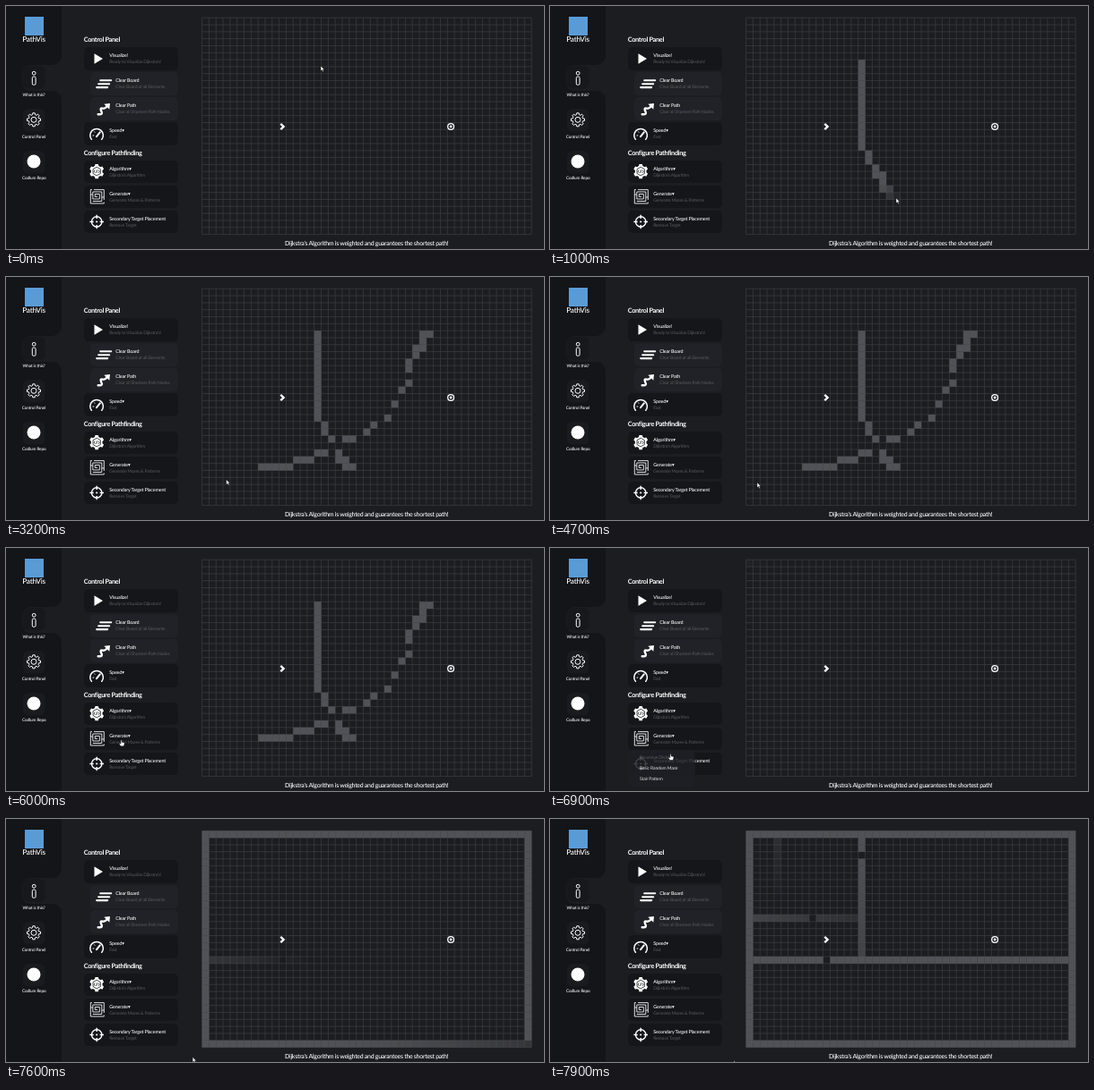
Animation of 600x272 px, one loop 8000 ms. Source, as an HTML page:

```html
<!DOCTYPE html>
<html lang="en">
<head>
<meta charset="utf-8">
<title>Pathfinding board</title>
<style>
html, body { margin: 0; width: 100%; height: 100%; overflow: hidden; background: #1c1d21; }
svg { display: block; width: 100vw; height: 100vh; }
text { font-family: Lato, "Open Sans", sans-serif; letter-spacing: -.03em; fill: #fff; text-rendering: geometricPrecision; }
.name { font-size: 8.3px; text-anchor: middle; font-weight: 500; }
.nav { font-size: 4.75px; text-anchor: middle; font-weight: 500; }
.head { font-size: 7.4px; font-weight: 700; letter-spacing: -.045em; }
.title { font-size: 5.4px; font-weight: 500; }
.sub { font-size: 5px; fill: #5a5b5f; }
.item { font-size: 5.1px; }
.foot { font-size: 7px; text-anchor: middle; font-weight: 500; letter-spacing: -.043em; }
.line { fill: none; stroke: #fff; }
</style>
</head>
<body>
<svg viewBox="0 0 600 272" id="stage">
  <!-- sidebar with the notch of the active tab -->
  <path fill="#141519" d="M0 0H62V54Q62 66 50 66H28Q18 66 18 76V85Q18 95 28 95H50Q62 95 62 107V272H0Z"/>
  <g fill="#17181c">
    <rect x="19" y="67" width="24.500" height="25.500" rx="6"/>
    <rect x="19" y="115" width="24.500" height="25.500" rx="6" fill="#1a1b1f"/>
    <rect x="19" y="162" width="24.500" height="25.500" rx="6" fill="#1a1b1f"/>
  </g>
  <rect x="21" y="12" width="21" height="21" fill="#5b9bd5"/>
  <text class="name" x="31" y="39.500">PathVis</text>
  <g class="line" stroke-width="1">
    <circle cx="31.200" cy="75.200" r="1.900"/>
    <rect x="29.300" y="79" width="3.800" height="9.300" rx="1.600"/>
    <circle cx="31" cy="127.300" r="3"/>
    <path id="cog" stroke-linejoin="round"/>
  </g>
  <circle cx="31" cy="174" r="7.500" fill="#fff"/>
  <text class="nav" x="31" y="100.700">What is this?</text>
  <text class="nav" x="31" y="147.700">Control Panel</text>
  <text class="nav" x="31.300" y="194.300">Codlum Repo</text>

  <text class="head" x="86.700" y="40.200">Control Panel</text>
  <text class="head" x="86.700" y="166.600">Configure Pathfinding</text>
  <g id="cards"></g>

  <!-- card icons -->
  <path fill="#fff" d="M98.500 53.200L108 59 98.500 64.800Z"/>
  <path class="line" stroke-width="2.100" stroke-linecap="round" d="M105.200 83.300H117.200M103.200 87.200H115.200M101.200 91.100H113.200"/>
  <path class="line" stroke-width="2.400" stroke-linecap="round" stroke-linejoin="round" d="M102.700 121.300H105Q108 121 106.300 117.700Q104.300 113.700 108 114.700Q110 115.300 112.500 112.500"/>
  <path fill="#fff" d="M109.300 109.700L116 109.100 115.300 115.700Z"/>
  <g class="line" stroke-width="1.500" stroke-linecap="round">
    <path d="M95.400 149.300A7.300 7.300 0 1 1 106.800 149.300"/>
    <path d="M101 146.200L104.800 141.300" stroke-width="2"/>
    <path d="M97 145H97.800M98.600 140.800L99 141.300" stroke-width="1"/>
  </g>
  <path id="gear" fill="#fff"/>
  <g fill="none" stroke="#15161a" stroke-width=".8">
    <path d="M101.200 180.300L105.400 182.700V187.500L101.200 189.900 97 187.500V182.700Z"/>
    <path d="M99.300 183.600L98.200 185.200 99.300 186.800M103.100 183.600L104.200 185.200 103.100 186.800M101.700 183.400L100.700 187"/>
  </g>
  <path class="line" stroke-width=".85" d="M98 205.600H109.300V217M109.300 219.500V221H94.300V205.600H96M96.800 218.500H106.800V208H96.800V216H104.300V210.500H99.300V213.500H101.900M94.300 211H96.800M106.800 214H109.300"/>
  <g class="line" stroke-width="1.400">
    <circle cx="101.200" cy="241.500" r="5.700"/>
    <path d="M101.200 233.700V238M101.200 245V249.300M93.400 241.500H97.700M104.700 241.500H109"/>
    <circle cx="101.200" cy="241.500" r="1.100" fill="#fff" stroke="none"/>
  </g>

  <path id="grid" fill="none" stroke="#3d3e42" stroke-width=".7"/>
  <g id="walls" fill="#515257"></g>
  <path class="line" stroke-width="2.300" d="M306.300 131.900L309.600 135 306.300 138.100"/>
  <circle class="line" cx="496.100" cy="135" r="3.400" stroke-width="1.300"/>
  <circle cx="496.100" cy="135" r="1.400" fill="#fff"/>
  <text class="foot" x="402.300" y="268.300">Dijkstra's Algorithm is weighted and guarantees the shortest path!</text>

  <g id="menu">
    <rect x="87" y="226" width="74.500" height="41" rx="5" fill="#1e2025"/>
    <text class="item" id="pick" x="100" y="236.200">Recursive Division</text>
    <text class="item" x="100" y="248">Basic Random Maze</text>
    <text class="item" x="100" y="259.500">Stair Pattern</text>
  </g>

  <g id="cursor">
    <path id="arrow" fill="#fff" stroke="#000" stroke-width=".4" d="M0 0V5.600L1.400 4.500 2.400 6.700 3.300 6.300 2.400 4.200H4Z"/>
    <path id="hand" fill="#fff" stroke="#000" stroke-width=".4" d="M-.6 0Q0-.8.6 0V2L3 2.600Q3.700 3 3.400 4L2.700 6.500H-.8L-2.400 4Q-2.500 3-1.600 3.200L-.6 4Z"/>
    <circle id="busy" cx="4.200" cy="-.4" r="2" fill="none" stroke="#3b82c4" stroke-width="1.100"/>
  </g>
</svg>
<script>
const LOOP = 8000, TICK = 100, FADE = 180;
const X0 = 218.6, Y0 = 13.2, CELL = 7.82, COLS = 47, ROWS = 31;
const CLEAR = 6900, MAZE_START = 6890, MAZE_STEP = 4.3;
const $ = id => document.getElementById(id);

function add(parent, tag, attrs, text) {
  const el = document.createElementNS("http://www.w3.org/2000/svg", tag);
  for (const k in attrs) el.setAttribute(k, attrs[k]);
  if (text) el.textContent = text;
  return parent.appendChild(el);
}

const range = (a, b) => {
  const step = a <= b ? 1 : -1;
  return Array.from({ length: Math.abs(b - a) + 1 }, (_, i) => a + i * step);
};
const column = (c, a, b) => range(a, b).map(r => [c, r]);
const row = (r, a, b) => range(a, b).map(c => [c, r]);

// Linear track through [key, value, value, ...] points
function track(points, k) {
  const last = points[points.length - 1];
  if (k <= points[0][0]) return points[0].slice(1);
  if (k >= last[0]) return last.slice(1);
  const i = points.findIndex(p => p[0] > k), a = points[i - 1], b = points[i];
  const f = (k - a[0]) / (b[0] - a[0]);
  return a.slice(1).map((v, j) => v + (b[j + 1] - v) * f);
}

function gearPath(cx, cy, inner, outer, teeth) {
  const pts = [];
  for (let i = 0; i < teeth; i++) {
    [[-.32, inner], [-.2, outer], [.2, outer], [.32, inner]].forEach(([o, r]) => {
      const a = (i + o) / teeth * 2 * Math.PI - Math.PI / 2;
      pts.push((cx + r * Math.cos(a)).toFixed(2) + " " + (cy + r * Math.sin(a)).toFixed(2));
    });
  }
  return "M" + pts.join("L") + "Z";
}
$("cog").setAttribute("d", gearPath(31, 127.3, 5.8, 7.6, 8));
$("gear").setAttribute("d", gearPath(101.2, 185.1, 6.4, 8.3, 6));

const DARK = "#15161a", LIGHT = "#202227";
[
  [87, 46, 26, "Visualize!", "Ready to Visualize Dijkstra's!", DARK],
  [94, 74, 26, "Clear Board", "Clear Board of all Elements", LIGHT],
  [94, 102, 26, "Clear Path", "Clear all Shortest-Path Nodes", LIGHT],
  [87, 130, 26, "Speed▾", "Fast", DARK],
  [87, 173, 25, "Algorithm▾", "Dijkstra's Algorithm", DARK],
  [87, 201, 25, "Generate▾", "Generate Mazes & Patterns", DARK],
  [87, 229, 25, "Secondary Target Placement", "Remove Target", DARK]
].forEach(([x, y, height, title, sub, fill]) => {
  const g = $("cards");
  add(g, "rect", { x, y, width: 192 - x, height, rx: 5, fill });
  add(g, "text", { class: "title", x: x + 28.3, y: y + 10.9 }, title);
  add(g, "text", { class: "sub", x: x + 28.3, y: y + 18.2 }, sub);
});

const right = X0 + COLS * CELL, bottom = Y0 + ROWS * CELL;
$("grid").setAttribute("d",
  range(0, COLS).map(i => `M${X0 + i * CELL} ${Y0}V${bottom}`).join("") +
  range(0, ROWS).map(i => `M${X0} ${Y0 + i * CELL}H${right}`).join(""));

const walls = [];
function addWall([c, r], on, off) {
  const el = add($("walls"), "rect", {
    x: X0 + c * CELL, y: Y0 + r * CELL, width: CELL + .05, height: CELL + .05
  });
  walls.push({ c, r, on, off, el });
}

// Hand-drawn strokes
const first = [
  ...column(16, 6, 18), ...column(17, 19, 20), ...column(18, 21, 22),
  ...column(19, 22, 24), ...column(20, 24, 25), [21, 25]
];
first.forEach((cell, i) => addWall(cell, 100 + i * 40, CLEAR));

const second = [
  ...row(6, 32, 31), ...column(31, 7, 8), ...column(30, 8, 9), ...column(29, 10, 11),
  [29, 13], [28, 14], [27, 16], [26, 18], [24, 19], [23, 20], ...row(21, 21, 20),
  ...row(22, 19, 18), ...row(23, 17, 16), ...row(24, 15, 13), ...row(25, 12, 8)
];
const pace = [[0, 1500], [4, 1700], [23, 2090], [27, 2650]];
second.forEach((cell, i) => {
  const [time] = track(pace, i);
  // Crossing an existing wall removes it
  const hit = walls.find(w => w.c === cell[0] && w.r === cell[1]);
  if (hit) hit.off = time;
  else addWall(cell, time, CLEAR);
});

// Recursive division: frame first, then split by split
const without = (cells, c, r) => cells.filter(p => p[0] !== c || p[1] !== r);
const maze = [
  ...row(0, 0, COLS - 1),
  ...range(1, ROWS - 2).flatMap(r => [[0, r], [COLS - 1, r]]),
  ...row(ROWS - 1, 0, COLS - 1),
  ...without(row(18, 1, COLS - 2), 11, 18),
  ...without(column(16, 1, 17), 16, 3),
  ...without(row(12, 1, 15), 9, 12),
  ...column(4, 1, 11)
];
maze.forEach((cell, i) => addWall(cell, MAZE_START + i * MAZE_STEP, LOOP));

const pointer = [
  [0, 351, 67], [100, 351, 67], [610, 350, 160], [900, 386, 215], [1050, 386, 215],
  [1450, 474, 64], [1700, 458, 80], [1900, 403, 173], [2090, 311, 210], [2650, 286, 212],
  [3400, 231, 232], [3600, 231, 232], [3800, 231, 231], [4600, 231, 231], [4700, 231, 230],
  [5300, 231, 230], [5900, 128, 214], [6200, 130, 218], [6600, 134.5, 231],
  [6900, 134.5, 231], [7300, 217.5, 254.5], [7700, 205, 270.5]
];
const menuFade = [[6000, 0], [6200, 1], [6800, 1], [6900, .85], [7000, 0]];

const show = (id, on) => $(id).setAttribute("visibility", on ? "visible" : "hidden");

function draw(t) {
  for (const w of walls) {
    const p = Math.min(1, Math.max(0, (t - w.on) / FADE));
    w.el.setAttribute("opacity", t < w.off ? 1 - Math.pow(1 - p, 1.5) : 0);
  }
  const [x, y] = track(pointer, t);
  $("cursor").setAttribute("transform", `translate(${x} ${y})`);
  const onLink = t >= 5700 && t < 7000;
  show("arrow", !onLink);
  show("hand", onLink);
  show("busy", t >= 2000 && t < 2500);
  $("menu").setAttribute("opacity", track(menuFade, t)[0]);
  $("pick").style.fill = t >= 6400 ? "#6a6b6f" : "#fff";
}

const start = performance.now();
function loop() {
  const t = (performance.now() - start) % LOOP;
  draw(Math.floor(t / TICK) * TICK);
  requestAnimationFrame(loop);
}
loop();
</script>
</body>
</html>
```
